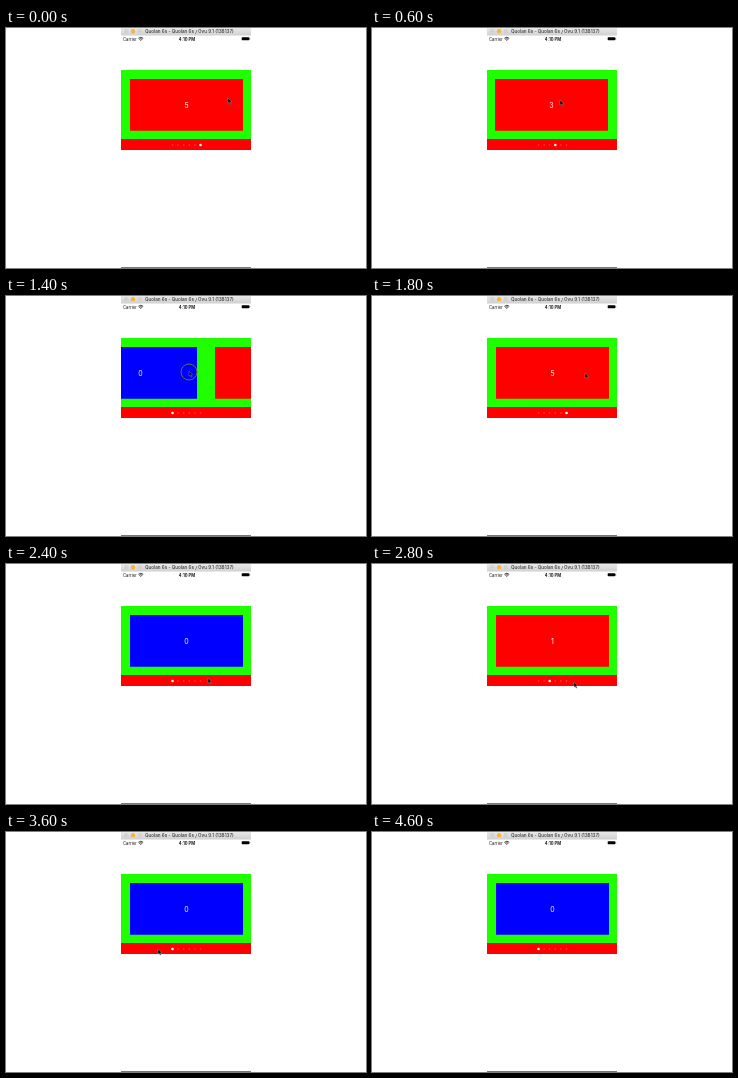
Recreate the animation shown at these times as an HTML page. Size 360 by 240 pixels, loop 4.8 s.

```html
<!DOCTYPE html>
<html lang="en">
<head>
<meta charset="utf-8">
<title>Looping pager</title>
<style>
  html, body { margin: 0; width: 100%; height: 100%; overflow: hidden; background: #fff; }
  svg { display: block; width: 360px; height: 240px; font-family: Inter, "Liberation Sans", sans-serif; }
</style>
</head>
<body>
<svg viewBox="0 0 360 240">
  <defs>
    <linearGradient id="bar" x2="0" y2="1">
      <stop stop-color="#e9e9e9"/><stop offset="1" stop-color="#d0d0d0"/>
    </linearGradient>
    <clipPath id="screen"><path d="M115 42h130v69h-130z"/></clipPath>
  </defs>

  <path fill="url(#bar)" d="M115 0h130v7.5h-130z"/>
  <circle cx="120.3" cy="3.2" r="2.2" fill="#d2d2d2"/>
  <circle cx="127" cy="3.2" r="2.2" fill="#f8b53a"/>
  <circle cx="133.8" cy="3.2" r="2.2" fill="#d2d2d2"/>
  <text x="139" y="5.2" font-size="4.6" font-weight="500" fill="#333">Quolan 6s - Quolan 6s / Ovu 9.1 (13B137)</text>

  <text x="117" y="12.6" font-size="4.2" fill="#111">Carrier</text>
  <path d="M132.4 10.3q2.4-2 4.8 0M133.3 11.4q1.5-1.2 3 0M134.4 12.5h.8" fill="none" stroke="#222" stroke-width=".9"/>
  <text x="181" y="12.6" font-size="4.2" font-weight="600" text-anchor="middle">4:10 PM</text>
  <rect x="235.7" y="9.2" width="7.6" height="3" rx=".6"/>
  <path d="M243.6 10h.5v1.4h-.5z"/>

  <path fill="#20ff00" d="M115 41.9h130v69.1h-130z"/>
  <g clip-path="url(#screen)"><g id="cards"></g></g>
  <path fill="#f00" d="M115 111h130v11h-130z"/>
  <g id="dots" fill="#fff"></g>
  <path fill="#777" d="M115 239h130v1h-130z"/>

  <g id="cursor">
    <circle id="press" cy="1" r="8" fill="none" stroke="#6b6a45"/>
    <path d="M0 0v5.2l1.2-1 .9 2 .9-.4-.9-1.9h1.6z" stroke="#ccc" stroke-width=".3"/>
  </g>
</svg>
<script>
const LOOP = 4800, STEP = 200, PAGES = 6, PITCH = 131;
const GLIDE = 200, HOLD = 150, TAPS_FROM = 2400;
const $ = id => document.getElementById(id);
const wrap = n => (n % PAGES + PAGES) % PAGES;
const clamp = t => Math.min(1, Math.max(0, t));
const ease = t => t * t * (3 - 2 * t);

// Page turns: start in ms, page reached (-1 wraps to the last).
const turns = [
  [100, 4], [410, 3], [680, 2], [1000, 1], [1280, 0], [1600, -1], [1910, 0],
  [2490, 1], [2800, 2], [3144, 1], [3400, 0]
];
// Pointer path: ms, x, y.
const path = [
  [0, 222, 70], [600, 188, 72], [1000, 153, 73], [1800, 213, 77], [2400, 202, 114],
  [2800, 202, 118], [3200, 152, 117], [3800, 152, 117], [4000, 181, 76], [4400, 218, 11]
];

for (let i = -1; i < PAGES; i++) {
  const x = 124 + i * PITCH;
  $("cards").innerHTML += `<path fill="${i % 2 ? "#f00" : "#00f"}" d="M${x} 51h113v51.7h-113z"/>
    <text x="${x + 56.5}" y="79.8" font-size="7" fill="#fff" text-anchor="middle">${wrap(i)}</text>`;
}
for (let i = 0; i < PAGES; i++) {
  $("dots").innerHTML += `<circle cx="${166.5 + i * 5.6}" cy="117"/>`;
}

function scroll(ms) {
  let page = 5, active = 5, pressed = false;
  for (const [start, to] of turns) {
    if (ms < start) break;
    const tapped = start >= TAPS_FROM;
    page += (to - page) * ease(clamp((ms - start) / GLIDE));
    active = wrap(tapped ? to : Math.round(page)); // a tap moves the dot at once
    pressed = !tapped && ms - start < HOLD;
  }
  return { page, active, pressed };
}

function pointer(ms) {
  const next = path.findIndex(key => key[0] >= ms);
  if (next < 0) return null;
  const [t1, x1, y1] = path[next], [t0, x0, y0] = path[Math.max(0, next - 1)];
  const k = t1 > t0 ? (ms - t0) / (t1 - t0) : 0;
  return [x0 + (x1 - x0) * k, y0 + (y1 - y0) * k];
}

function draw(ms) {
  const { page, active, pressed } = scroll(ms);
  const tip = pointer(ms);
  $("cards").setAttribute("transform", `translate(${Math.round(-page * PITCH)} 0)`);
  [...$("dots").children].forEach((dot, i) => {
    dot.setAttribute("r", i === active ? 1.3 : .8);
    dot.setAttribute("opacity", i === active ? 1 : .3);
  });
  $("cursor").style.display = tip ? "" : "none";
  if (tip) $("cursor").setAttribute("transform", `translate(${tip})`);
  $("press").style.display = pressed ? "" : "none";
}

const start = performance.now();
function tick() {
  const ms = (performance.now() - start) % LOOP;
  draw(Math.floor(ms / STEP) * STEP);
  requestAnimationFrame(tick);
}
tick();
</script>
</body>
</html>
```
